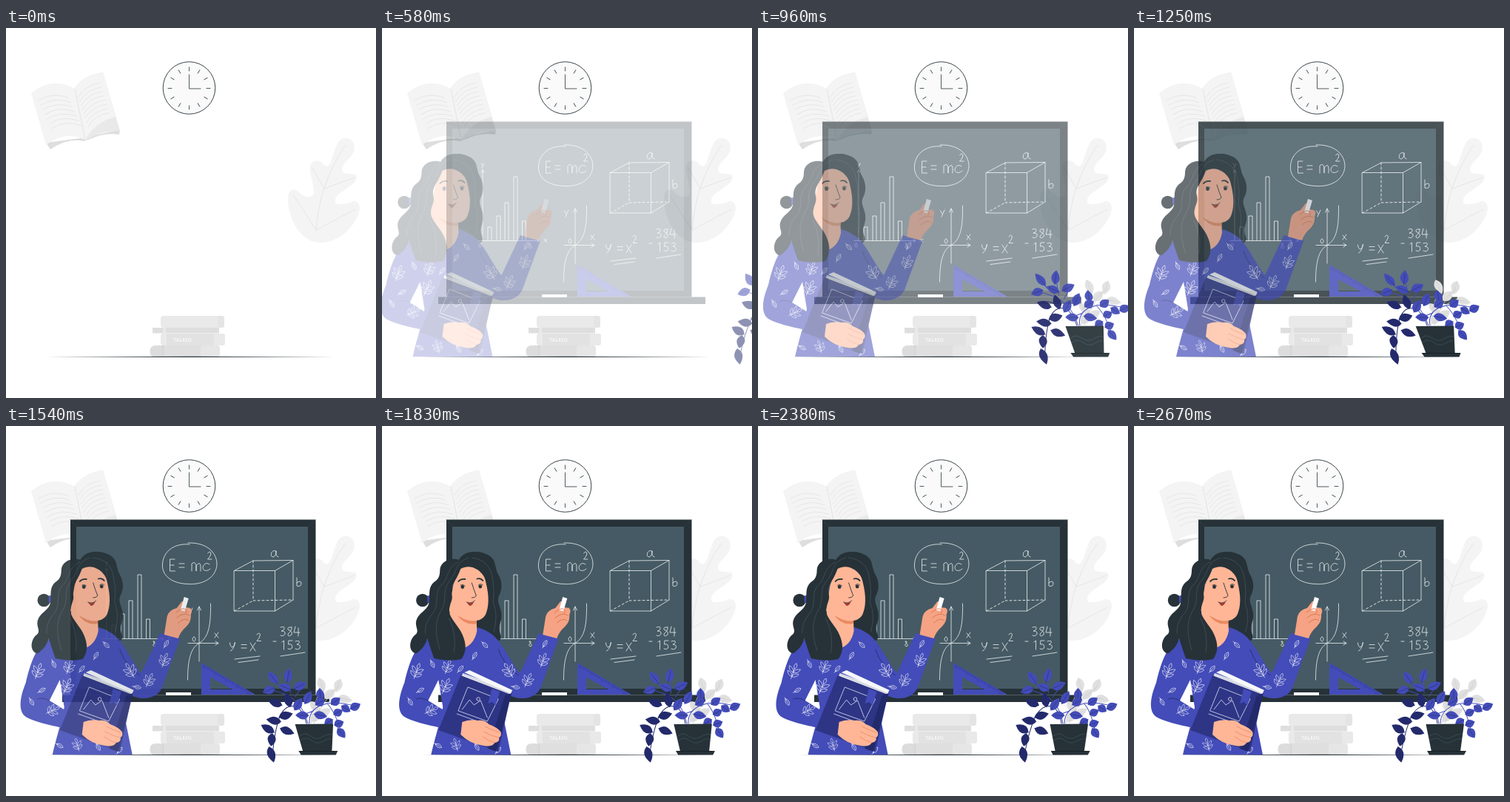
Recreate the animation shown at these times as an HTML page. Size 500 px wide and 500 px high, loop 2710 ms.

```html
<!DOCTYPE html>
<html lang="en">
<head>
<meta charset="utf-8">
<title>Maths lesson</title>
<style>
  html, body { margin: 0; width: 100%; height: 100%; overflow: hidden; background: #fff; }
  svg { display: block; width: 100vw; height: 100vh; }
  .line { fill: none; stroke-linecap: round; stroke-linejoin: round; }
</style>
</head>
<body>
<svg id="stage" viewBox="0 0 500 500">
  <g id="room"></g>
  <g id="board" opacity="0"></g>
  <g id="teacher" opacity="0"></g>
  <g id="plant" opacity="0"></g>
</svg>
<script>
const INK = '#263238', SLATE = '#455a64', BLUE = '#434cb8', NAVY = '#232a6c',
      SKIN = '#ffb696', TAN = '#f5a384';
const $ = id => document.getElementById(id);
const fill = (d, c) => `<path d="${d}" fill="${c}"/>`;
const line = (d, c, w = 0.8, extra = '') =>
  `<path class="line" d="${d}" stroke="${c}" stroke-width="${w}" ${extra}/>`;
const rect = (x, y, w, h, c, r = 0) =>
  `<rect x="${x}" y="${y}" width="${w}" height="${h}" rx="${r}" fill="${c}"/>`;
const dot = (x, y, r, c) => `<circle cx="${x}" cy="${y}" r="${r}" fill="${c}"/>`;
const repeat = (n, f) => Array.from({ length: n }, (_, i) => f(i)).join('');

function drawRoom() {
  const book =
    fill('M54 155L60 164Q84 148 105 153L114 150Q132 141 153 144L154 137L107 148Z', '#dedede') +
    fill('M34 88Q62 65 93 82L107 151Q80 138 54 158Z', '#f4f4f4') +
    fill('M93 81Q106 63 131 60L154 139Q129 138 107 152Z', '#e9e9e9') +
    fill('M93 81Q106 63 131 60L148 120Q122 126 107 151Z', '#f4f4f4') +
    line('M93 82L107 151', '#e4e4e4', 1) +
    repeat(7, i => {
      const x = 44 + 2.9 * i, y = 98 + 6.3 * i;
      return line(`M${x} ${y}q18 -12 40 -4`, '#e2e2e2');
    }) +
    repeat(8, i => {
      const x = 98 + 1.8 * i, y = 93 + 5.8 * i;
      return line(`M${x} ${y}q9 -16 29 -19`, '#e2e2e2');
    });
  const leaf =
    fill('M457 149C468 147 473 157 470 167C466 177 453 184 454 192C456 200 469 195 473 199' +
      'C478 211 454 217 446 229C440 242 458 239 469 234C476 233 480 240 477 249' +
      'C470 272 447 291 423 290C396 288 381 255 381 232C381 216 390 216 396 222' +
      'C404 230 415 231 416 222C416 208 409 197 411 186C415 177 424 178 429 184' +
      'C437 193 440 177 444 166C447 157 450 150 457 149Z', '#f4f4f4') +
    line('M419 273Q422 240 430 216Q440 186 458 159M430 217L414 189M430 217L471 202' +
      'M388 225L419 273L472 245', '#e6e6e6', 1);
  const clock =
    `<circle cx="247.5" cy="81" r="35.3" fill="#fafafa" stroke="${INK}" stroke-width=".9"/>` +
    repeat(12, i => `<g transform="rotate(${i * 30} 247.5 81.5)">` +
      line('M247.5 53V58', INK, 0.8) + '</g>') +
    line('M247.5 63V82H263', INK, 0.8);
  const pile =
    rect(209, 389, 86, 16, '#e9e9e9', 4) + rect(286, 389, 9, 16, '#e4e4e4', 3) +
    rect(198, 405, 90, 7.5, '#dedede', 1) + rect(212, 405, 4, 7.5, '#e9e9e9') +
    rect(209, 413, 87, 16, '#e9e9e9', 3) + rect(217, 413, 64, 16, '#e2e2e2') +
    `<text x="226" y="424" font-family="Open Sans, sans-serif" font-size="7.5" fill="#fff">TALKIN</text>` +
    rect(194.5, 429, 94, 16, '#dcdcdc', 7) + rect(214, 429, 50, 16, '#e0dfdf') +
    rect(263, 429, 26, 16, '#e6e6e6', 4) + line('M212 429V444', '#d2d2d2', 1);
  return book + leaf + clock + pile +
    fill('M53 444.4L249 443.8L445 444.4L249 445Z', INK);
}

function drawBoard() {
  const chalk = '#edf0f1';
  const bars = [[143, 269], [155, 254], [166, 236], [178, 201], [189.5, 261]]
    .map(([x, y]) => `M${x} 287V${y}h5V287`).join('');
  const chart = 'M136 287V192M134 195l2 -3.5l2 3.5M130 287.5H213M210 285.5l3 2l-3 2' +
    'M134 183l2 3M138 183l-3 6M132.5 291a1.7 2.7 0 1 0 .1 0M199 291q4 0 1 3q-3 3 1 4q3 -1 0 -4q-3 -2 -1 -3' +
    'M219 285l4 4M223 285l-4 4';
  const energy = 'M246 158C270 157 285 170 285 187C284 205 266 215 246 213.5C224 213 210 202 211.5 186C213 168 229 158 248 160' +
    'M228 180H221.5V196H228.5M222 188H227M234 186H241M234 191H241' +
    'M251 196V186Q256 182 257 189V196V189Q262 182 263 189V196' +
    'M275 187C270 183 266 188 266 192C267 197 273 196 276 193' +
    'M272.5 172Q276 168 277 172Q277 176 272.5 180H278';
  const cube = 'M308.5 195.5H363.5V250H308.5ZM308.5 195.5L334 182L388 181.5L363.5 195.5M388 181.5V235L363.5 250' +
    'M365 169C358 166 356 177 361 177Q365 176 365 169Q364 176 368 177' +
    'M393 205V216Q399 218 399 212Q398 208 393 212';
  const graph = 'M261 318V244M258.5 249l2.5 -5l2.5 5M246 293.5H287M283 291l4 2.5l-4 2.5' +
    'M276.5 240C277 272 273 286 261 293.5C249 300 245.5 318 245.5 343' +
    'M246.5 247l2.5 4M252 246l-4 9M282 280l5 6M287 279l-5 7M254 285a2 3 0 1 0 .1 0';
  const formula = 'M302.5 293Q303 299 306 299Q309 297 309.5 292.5M309.5 292.5Q308 302 303.5 304' +
    'M318 295.5H325M318 300H325M330 293L337 304M337 293L330 304' +
    'M339 282Q342 278 343.5 282Q343 286 339 290.5H344.5M309 315L343 311M314 319.5L341 316';
  const sums = 'M371 272Q377 270 376 274Q375 277 372 277Q378 277 377 281Q375 285 371 283' +
    'M386 272Q380 271 381 275Q388 278 386 282Q381 286 381 281Q387 276 386 272' +
    'M391 271L389 279H397M395 273V284M361 291H365' +
    'M373 292L375.5 290V302M387 290H382L381.5 295Q388 294 386.5 300Q384 303 381 301' +
    'M391 291Q398 289 396 293Q395 295 393 295Q399 296 397 300Q395 303 391 301M371 311L404 306';
  const square =
    `<path fill-rule="evenodd" fill="${BLUE}" d="M264 320V363H337ZM276 339.5V356H306Z"/>` +
    repeat(22, i => line(`M${267 + i * 3} ${323 + i * 1.78}v${i % 5 ? 2 : 4}`, NAVY, 0.5));
  return rect(87, 126.5, 331.5, 237, INK) + rect(95, 136, 313, 219, SLATE) +
    line('M87 127L95 136M418 127L408 136M87 363L95 355M418 363L408 355', '#37474f', 0.5) +
    rect(76, 363.5, 361, 9.5, INK) + line('M87 363.5H418', '#4b5a62', 0.5) +
    line(bars + chart + energy + cube + graph + formula + sums, chalk, 0.8) +
    line('M334 182V236L388 235M308.5 250L334 236', chalk, 0.9, 'stroke-dasharray="3 3"') +
    rect(216, 360, 34, 4, '#fff') + square;
}

// A small outlined twig used as the dress print.
function sprig(x, y, a, s = 1) {
  const d = 'M0 9V-5M0 -5Q-4 -9 0 -13Q4 -9 0 -5M0 0Q-7 0 -8 -7Q-1 -6 0 0' +
    'M0 0Q7 0 8 -7Q1 -6 0 0M0 6Q-6 6 -8 0Q-1 0 0 6M0 6Q6 6 8 0Q1 0 0 6';
  return `<g transform="translate(${x} ${y}) rotate(${a}) scale(${s})">${line(d, '#dfe1f5', 0.7)}</g>`;
}
const bud = (x, y, a) => `<g transform="translate(${x} ${y}) rotate(${a})">` +
  line('M-5 0Q0 -5 5 0Q0 5 -5 0M-7 0H2', '#dfe1f5', 0.7) + '</g>';

function drawTeacher() {
  const backHair =
    dot(54.5, 235.5, 8.7, INK) + rect(61, 229, 6, 10, BLUE, 2) +
    fill('M104 180C112 168 137 167 148 178C154 184 152 192 156 199C162 209 163 219 158 229' +
      'C153 239 163 246 161 260C159 270 156 272 160 282Q163 289 153 293L100 290Z', INK);
  const dress =
    fill('M62 287C43 298 36 322 30 347C21 369 20 386 30 393C49 404 82 406 106 416L109 399' +
      'C95 392 80 382 62 371L76 343L82 380C78 402 70 425 66 444.3H174C171 430 168 414 165 400L162 358' +
      'C180 372 205 372 214 354L238.5 287L211.5 280L186 334C172 318 163 291 146 280Q137 274 128 272L92 285Z', BLUE) +
    line('M157 302Q165 325 184 337M162 358Q157 352 153 347M62 371Q52 366 46 369', NAVY, 0.8);
  const print = [[46, 333, 20], [85, 353, 25], [88, 327, 20, .9], [172, 332, -30], [196, 345, 25, .9],
    [217, 318, 20, .9], [65, 385, 65, .9], [100, 432, -15, .8], [150, 423, 25, .8]]
    .map(p => sprig(...p)).join('') +
    [[68, 322, 65], [106, 328, -50], [139, 296, 45], [125, 310, -60], [220, 294, -60], [181, 353, 10],
      [52, 357, -30], [38, 373, 60], [76, 432, 30], [128, 434, 60], [91, 407, 70], [157, 438, -50]]
      .map(p => bud(...p)).join('');
  const head =
    fill('M92 244L90 262Q103 278 107 301Q124 297 128 277L127 255Z', SKIN) +
    fill('M101 255Q114 265 128 262L127 267Q111 270 101 255Z', '#ea8a61') +
    fill('M104 192C118 182 137 193 140 211C145 231 144 244 140 254C135 265 119 266 108 259L90 250L96 215Z', SKIN) +
    dot(108.5, 217.5, 2.4, INK) + dot(132.5, 217, 2.4, INK) +
    line('M103 210Q106 206 112 207M128 206.5Q133 205 136 209', INK, 1.8) +
    line('M106 215Q109 213 112 216M130 215Q133 212 136 215', INK, 0.8) +
    line('M121 212Q124 222 127 229Q126 232 121 232', INK, 0.9) +
    fill('M114 238Q120 241 124 237Q122 243 118 243Q116 241 114 238Z', '#a83c32') +
    line('M114 238Q120 241 125 236', INK, 0.8);
  const frontHair =
    fill('M128 170C113 169 107 175 104 181C94 177 79 182 78 194C78 203 76 207 70 211C61 219 65 229 63 240' +
      'C60 250 49 252 46 263C44 271 50 276 46 281C38 286 35 299 41 305Q46 310 50 304Q58 298 61 287' +
      'Q66 303 70 314Q92 319 107 315C113 306 114 298 110 286C106 274 98 267 93 258C88 249 92 242 94 235' +
      'C96 228 91 224 95 215C98 209 102 204 106 193C119 186 132 194 138 204Q143 211 143 224L155 220' +
      'C158 195 152 172 128 170Z', INK) +
    line('M117 178C98 184 102 196 92 208C80 222 88 233 81 247C72 261 70 277 78 303' +
      'M103 184C87 190 90 207 79 216C70 226 77 239 70 251Q57 265 58 280M90 260Q101 280 97 306' +
      'M121 178Q146 181 149 206Q152 219 150 239Q157 255 151 278', '#4d5c64', 0.6);
  const book =
    fill('M109 334L175 358L172 370L106 342Z', '#e9ebf0') + line('M110 336L172 361M109 339L171 364', '#a9b0bd', 0.6) +
    fill('M118 330L176 357L173 361L111 333Z', '#f7f8fa') +
    fill('M106 337L174 363L157 440L76 411Z', '#2e3585') +
    fill('M166 364L175 361L154 440L143 436Z', NAVY) +
    line('M116 353L157 369L142 399L103 385ZM108 383L118 370L124 377L133 371L142 394M101 389L131 400', '#dfe1f5', 0.8) +
    line('M127.5 369a2.3 2.3 0 1 0 4.6 0a2.3 2.3 0 1 0 -4.6 0', '#dfe1f5', 0.8) +
    fill('M148 355L159 359L153 378L149 373L143 375Z', BLUE);
  const hands =
    fill('M108 400Q118 396 129 398Q139 397 144 403Q155 407 160 413Q162 418 158 421Q159 427 152 428' +
      'Q149 434 137 432Q119 430 106 417Z', SKIN) +
    line('M139 406Q148 411 158 414M137 413Q147 419 157 421M136 420Q144 426 152 428', '#ea8a61', 0.8) +
    fill('M217 282L221 257Q223 249 234 246L241 237Q247 236 246 245L252 246Q256 248 253 255' +
      'Q254 264 247 271Q239 278 236 287Z', TAN) +
    fill('M239 249L244 231L250 233L245 250Z', '#fff') +
    line('M233 252Q241 246 244 247Q249 249 246 253M234 259Q244 251 251 256M236 266Q245 258 250 263', '#d9774f', 0.9);
  return backHair + dress + print + head + frontHair + book + hands;
}

function drawPlant() {
  const leaf = (x, y, a, c, l = 10) => `<g transform="translate(${x} ${y}) rotate(${a})">` +
    fill(`M${-l} 0Q${-l / 4} -11 ${l} 0Q${-l / 4} 11 ${-l} 0Z`, c) +
    line(`M${-l} 0H${l * .6}`, c === '#e0e0e0' ? '#cfcfcf' : NAVY, 0.5) + '</g>';
  const group = (list, c) => list.map(([x, y, a, l]) => leaf(x, y, a, c, l)).join('');
  const grey = group([[435, 350, 75], [457, 351, 115], [465, 369, 15], [445, 362, -40],
    [424, 380, 50], [424, 392, -50], [436, 387, -30]], '#e0e0e0') +
    line('M420 402Q430 375 458 352M426 386Q448 363 466 369M416 402Q418 384 432 358', '#cfcfcf', 0.8);
  const stems =
    line('M410 402C406 376 389 371 376 390Q367 408 361 441M389 376Q377 366 368 372', NAVY, 1) +
    line('M412 402C407 377 397 363 363 356M386 359Q376 353 371 341M392 361L391 340M398 366L408 352' +
      'M414 402C414 380 438 367 480 379M433 378V362M441 376Q450 386 456 414M421 385L404 391', BLUE, 1);
  const dark = group([[370, 374, 200], [388, 370, 260], [366, 398, 188], [383, 391, -15], [357, 409, 210],
    [383, 412, 20], [361, 424, 100, 9], [359, 444, 78, 11]], NAVY);
  const light = group([[370, 340, 235], [391, 337, -75], [363, 357, 160, 9], [385, 353, 205, 9],
    [406, 351, -25], [401, 376, -55], [415, 367, -60], [432, 362, -90, 8], [405, 391, 180, 9],
    [431, 373, -30, 8], [430, 391, 10, 9], [452, 372, -35, 8], [465, 382, 35, 7], [478, 379, -25, 8],
    [454, 387, -25, 7], [440, 400, 150, 7], [454, 402, -20, 7], [456, 415, 55, 8]], BLUE);
  const pot = fill('M394.5 403L446 402.5L441 440H402Z', INK) +
    fill('M396 439H449L446 444.5H399Z', INK) + line('M399 439.5H445', '#121a1f', 0.7) +
    line('M399 419Q407 413 414 419T430 420T443 417M400 425Q408 419 415 425T431 426T442 423', SLATE, 0.6);
  return grey + stems + dark + light + pot;
}

$('room').innerHTML = drawRoom();
$('board').innerHTML = drawBoard();
$('teacher').innerHTML = drawTeacher();
$('plant').innerHTML = drawPlant();

// Motion tables: [step, value], 24 steps per second.
const LOOP = 2710, HOLD = 245, STEP = 1000 / 24;
const boardFade = [[-1, 0], [8, .28], [17, .6], [24, .84], [29, 1]];
const teacherFade = [[-1, 0], [35, 1]];
const teacherX = [[-1, -33], [8, -24.5], [17, -16], [24, -9], [35, 0], [38, .3],
  [43, 1.5], [47, 2], [51, 1.6], [58, 0]];
const plantFade = [[-1, 0], [8, .51], [17, .93], [22, 1]];
const plantX = [[-1, 244], [8, 122], [13, 67], [17, 31], [21, 8], [24, -2], [31, 2], [38, 2], [51, -.5], [58, 0]];
const plantSkew = [[-1, -20], [8, -2], [17, 8.5], [21, 10], [24, 10], [31, 5], [38, 1.8], [51, -.5], [58, 0]];

function at(keys, n) {
  const i = keys.findIndex(k => k[0] >= n);
  if (i < 0) return keys[keys.length - 1][1];
  if (i === 0) return keys[0][1];
  const [a, u] = keys[i - 1], [b, v] = keys[i];
  return u + (v - u) * (n - a) / (b - a);
}

function frame(now) {
  const n = Math.max(-1, Math.floor((now % LOOP - HOLD) / STEP));
  const k = Math.tan(at(plantSkew, n) * Math.PI / 180);
  $('board').setAttribute('opacity', at(boardFade, n));
  $('teacher').setAttribute('opacity', at(teacherFade, n));
  $('teacher').setAttribute('transform', `translate(${at(teacherX, n)} 0)`);
  $('plant').setAttribute('opacity', at(plantFade, n));
  $('plant').setAttribute('transform', `matrix(1 0 ${k} 1 ${at(plantX, n) - 470 * k} 0)`);
}

const start = performance.now();
(function tick() {
  frame(performance.now() - start);
  requestAnimationFrame(tick);
})();
</script>
</body>
</html>
```
